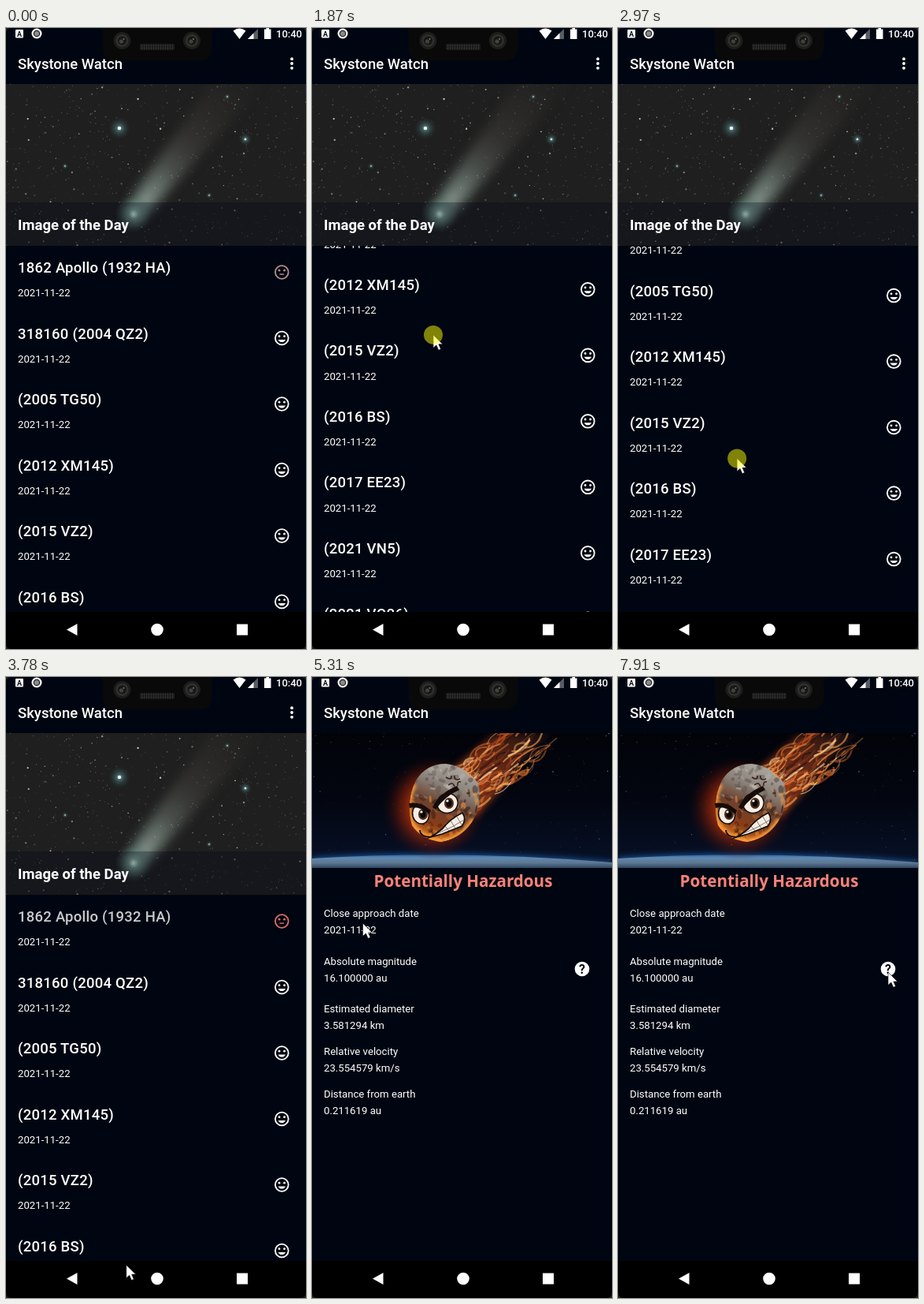
An HTML page with a canvas that plays this animation: 381x787 px, repeating every 8000 ms.

```html
<!DOCTYPE html>
<html lang="en">
<head>
<meta charset="utf-8">
<title>Skystone Watch</title>
<style>
  html, body { margin: 0; width: 100%; height: 100%; overflow: hidden; background: #000611; }
  canvas, svg { position: absolute; left: 0; display: block; }
  canvas { top: 71px; }
  svg { top: 0; }
  text { font-family: Roboto, sans-serif; fill: #fff; white-space: pre; }
  .bar { font-size: 18.54px; font-weight: 500; }
  .name { font-size: 18.54px; font-weight: 500; letter-spacing: .0125em; }
  .small { font-size: 13.2px; }
  .hazard { font: 700 20.6px "Open Sans", sans-serif; fill: #f9827a; text-anchor: middle; }
</style>
</head>
<body>
<canvas id="cometPhoto" width="381" height="205"></canvas>
<canvas id="rockPhoto" width="381" height="171"></canvas>
<svg width="381" height="787" viewBox="0 0 381 787">
  <defs>
    <clipPath id="listArea"><rect y="276" width="381" height="464"/></clipPath>
    <g id="ring"><circle r="8.35" fill="none" stroke="currentColor" stroke-width="1.85"/>
      <circle cx="-3.25" cy="-2.3" r="1.4" fill="currentColor"/><circle cx="3.25" cy="-2.3" r="1.4" fill="currentColor"/></g>
    <g id="happy"><use href="#ring"/><path d="M-4.7 1.9H4.7A5.1 5.1 0 0 1-4.7 1.9Z" fill="currentColor"/></g>
    <g id="neutral"><use href="#ring"/><path d="M-2.8 1.9h5.6v1.4h-5.6z" fill="currentColor"/></g>
    <g id="lens"><circle r="11" fill="#1d1d1c"/><circle r="8" fill="#30302e"/><circle r="5.5" fill="#171716"/>
      <circle cx="-1" cy="1" r="2.6" fill="#41413e"/><circle cx="2" cy="-2" r="1" fill="#77776f"/></g>
    <pattern id="mesh" width="3" height="3" patternUnits="userSpaceOnUse">
      <rect width="3" height="3" fill="#161616"/><circle cx="1.5" cy="1.5" r=".9" fill="#3b3b3b"/></pattern>
  </defs>

  <g id="listScreen">
    <text class="bar" x="15" y="256" style="font-weight:700">Image of the Day</text>
    <g fill="#fff"><circle cx="363" cy="39.2" r="1.9"/><circle cx="363" cy="45" r="1.9"/><circle cx="363" cy="50.8" r="1.9"/></g>
    <g clip-path="url(#listArea)"><g id="rows"></g></g>
  </g>

  <g id="detailScreen">
    <text class="hazard" x="192" y="265.5">Potentially Hazardous</text>
    <g id="facts"></g>
    <circle cx="343" cy="370" r="9.3" fill="#fff"/>
    <text x="343" y="375.8" text-anchor="middle" style="font-size:16px;font-weight:700;fill:#000611">?</text>
  </g>

  <text class="bar" x="15" y="51.5">Skystone Watch</text>

  <g id="statusBar" fill="#fff">
    <rect x="12" y="2" width="10" height="10.5" rx="1"/>
    <text x="17" y="10.5" text-anchor="middle" style="font-size:9px;font-weight:700;fill:#000611">A</text>
    <circle cx="39" cy="7" r="6.5"/><circle cx="39" cy="7" r="3.7" fill="#8a8a8a" stroke="#222" stroke-width="1.2"/>
    <path d="M288.500 3.500Q296.500-2.500 304.500 3.500L296.500 14Z"/>
    <path d="M320 1V14H307Z" opacity=".35"/><path d="M314.500 6.500V14H307Z"/>
    <path d="M328 1.500h2.500V0h3.500v1.500h2.500V14H328z"/>
    <text x="343" y="12" style="font-size:13px;font-weight:500">10:40</text>
  </g>

  <path d="M119 0Q123 1 123 8V26Q123 41 139 41H246Q261 41 261 26V8Q261 1 265 0Z" fill="#090909"/>
  <use href="#lens" x="147.500" y="16"/><use href="#lens" x="236" y="16"/>
  <rect x="170" y="20" width="44" height="8" rx="2" fill="url(#mesh)"/>

  <rect y="740" width="381" height="47"/>
  <g fill="#fff"><path d="M77 762.500L90.500 755V770Z"/><circle cx="192" cy="762.500" r="7.800"/><rect x="293" y="755.500" width="14" height="14"/></g>
  <g fill="#241d20"><path d="M0 0H7Q0 0 0 8Z"/><path d="M381 0H374Q381 0 381 8Z"/>
    <path d="M0 787H7Q0 787 0 779Z"/><path d="M381 787H374Q381 787 381 779Z"/></g>

  <g id="pointer">
    <path d="M0 0V16.500L3.900 13L6.700 19.300L9.600 18L6.900 11.900H12Z" fill="#fff" stroke="#000" stroke-width=".6"/>
    <circle id="touch" r="12" fill="#ff0" opacity=".5"/>
  </g>
</svg>

<script>
const $ = id => document.getElementById(id);
const LOOP = 8000, ROW = 83.5;

const asteroids = ['1862 Apollo (1932 HA)', '318160 (2004 QZ2)', '(2005 TG50)', '(2012 XM145)', '(2015 VZ2)',
  '(2016 BS)', '(2017 EE23)', '(2021 VN5)', '(2021 VQ26)'];
$('rows').innerHTML = asteroids.map((name, i) => `<g transform="translate(0 ${i * ROW})">
  <text class="name" x="15" y="310">${name}</text>
  <text class="small" x="15" y="340.400">2021-11-22</text>
  <use href="#${i ? 'happy' : 'neutral'}" x="350.300" y="309.500" color="#fff"/></g>`).join('');
const firstName = $('rows').querySelector('text');
const firstIcon = $('rows').querySelector('use');

const facts = [
  [304, 'Close approach date', '2021-11-22'], [364.5, 'Absolute magnitude', '16.100000 au'],
  [425, 'Estimated diameter', '3.581294 km'], [479, 'Relative velocity', '23.554579 km/s'],
  [533, 'Distance from earth', '0.211619 au']];
$('facts').innerHTML = facts.map(([y, label, value]) =>
  `<text class="small" x="15" y="${y}">${label}</text><text class="small" x="15" y="${y + 21.3}">${value}</text>`).join('');

function seeded(seed) {
  return () => (seed = (seed * 16807) % 2147483647) / 2147483647;
}

// Photos are painted in stage coordinates.
function photo(id) {
  const ctx = $(id).getContext('2d');
  ctx.translate(0, -71);
  return ctx;
}

function glow(ctx, x, y, r, ...colors) {
  const g = ctx.createRadialGradient(x, y, 0, x, y, r);
  colors.forEach((c, i) => g.addColorStop(i / (colors.length - 1), c));
  ctx.fillStyle = g;
  ctx.fillRect(x - r, y - r, 2 * r, 2 * r);
}

function fade(ctx, x0, y0, x1, y1, ...colors) {
  const g = ctx.createLinearGradient(x0, y0, x1, y1);
  colors.forEach((c, i) => g.addColorStop(i / (colors.length - 1), c));
  return g;
}

function ellipse(ctx, x, y, rx, ry, angle, color) {
  ctx.fillStyle = color;
  ctx.beginPath();
  ctx.ellipse(x, y, rx, ry, angle, 0, 7);
  ctx.fill();
}

function stars(ctx, count, seed, color, maxSize) {
  const rnd = seeded(seed);
  for (let i = 0; i < count; i++) {
    ctx.globalAlpha = .15 + .75 * rnd() ** 2;
    const size = .45 + maxSize * rnd() ** 7;
    ellipse(ctx, rnd() * 381, 71 + rnd() * 205, size, size, 0, color);
  }
  ctx.globalAlpha = 1;
}

function shape(ctx, path, fill, stroke, width = 1) {
  const p = new Path2D(path);
  if (fill) { ctx.fillStyle = fill; ctx.fill(p); }
  if (stroke) { ctx.strokeStyle = stroke; ctx.lineWidth = width; ctx.stroke(p); }
}

function paintComet() {
  const ctx = photo('cometPhoto');
  ctx.fillStyle = '#1f1f1f';
  ctx.fillRect(0, 71, 381, 205);
  stars(ctx, 800, 77, '#d8d4cc', .8);

  ctx.save();
  ctx.translate(163, 236);
  ctx.rotate(-.88);
  ctx.filter = 'blur(7px)';
  shape(ctx, 'M-12-3Q0-18 60-20L240-34V22L60 15Q0 17-12 4Z', fade(ctx, 0, 0, 240, 0,
    'rgba(125,152,142,.75)', 'rgba(125,138,130,.55)', 'rgba(95,92,86,.3)', 'rgba(75,70,64,.18)', 'rgba(60,57,52,0)'));
  shape(ctx, 'M-4-4L70-10V6L-4 5Z', fade(ctx, 0, 0, 70, 0, 'rgba(190,205,195,.8)', 'rgba(140,150,142,0)'));
  ctx.restore();
  glow(ctx, 162, 235, 24, 'rgba(150,190,176,.85)', 'rgba(90,130,118,.5)', 'rgba(60,92,84,0)');
  glow(ctx, 162, 236, 6, '#d5e8dd', 'rgba(180,215,200,0)');

  for (const [x, y, r] of [[144, 127, 14], [304, 141, 8], [258, 212, 4], [281, 87, 4], [75, 175, 4]]) {
    glow(ctx, x, y, r, 'rgba(140,190,195,.7)', 'rgba(65,105,108,.4)', 'rgba(40,65,65,0)');
    ellipse(ctx, x, y, r / 6, r / 6, 0, '#e9f5f3');
  }
  ctx.fillStyle = 'rgba(0,6,20,.3)';
  ctx.fillRect(0, 221, 381, 55);
}

function paintFlames(ctx, rnd) {
  ctx.save();
  ctx.filter = 'blur(5px)';
  shape(ctx, 'M178 118L232 72H302L268 104L236 146L206 178Z',
    fade(ctx, 190, 150, 290, 75, 'rgba(190,70,18,.9)', 'rgba(120,48,24,.8)', 'rgba(60,32,28,.5)'));
  ctx.filter = 'blur(.6px)';
  ctx.lineCap = 'round';
  const tones = ['#ffe0a8', '#ffb25e', '#ee7a30', '#c4521e', '#5a2418', '#1d0e0c'];
  for (let i = 0; i < 150; i++) {
    const along = rnd(), across = (rnd() - .5) * 64;
    const x = 188 + 90 * along + across * .6, y = 148 - 70 * along + across * .72;
    const length = 10 + 18 * rnd(), bend = (rnd() - .5) * 18;
    ctx.globalAlpha = .3 + .5 * rnd();
    shape(ctx, `M${x} ${y}q${length * .45 + bend} ${bend - length * .25} ${length} ${-length * .75}`, null,
      tones[Math.min(5, Math.floor(rnd() * 5 + along * 1.2))], .6 + 3 * rnd() * (1 - along * .4));
  }
  ctx.restore();
}

function paintRock() {
  const ctx = photo('rockPhoto'), rnd = seeded(41);
  ctx.fillStyle = fade(ctx, 0, 71, 0, 236, '#020309', '#030610', '#071026');
  ctx.fillRect(0, 71, 381, 171);
  stars(ctx, 220, 19, '#7088ac', .5);

  ctx.save();
  ctx.shadowColor = '#1f66b4';
  ctx.shadowBlur = 8;
  shape(ctx, 'M0 230Q185 219 381 235V242H0Z', fade(ctx, 0, 223, 0, 242, '#1c569e', '#5f88ae', '#5d7791', '#2f4560'));
  ctx.restore();

  glow(ctx, 155, 166, 66, 'rgba(255,110,20,.9)', 'rgba(235,75,10,.85)', 'rgba(150,34,8,.5)', 'rgba(50,8,4,0)');
  paintFlames(ctx, rnd);

  const outline = 'M132 131Q145 110 170 110Q196 113 211 135Q217 158 206 179Q192 204 164 209Q139 206 127 188Q119 158 132 131Z';
  shape(ctx, outline, fade(ctx, 176, 112, 138, 208, '#aaa49c', '#8a827a', '#6b4230', '#8a3c16', '#f08a2c'));
  ctx.save();
  ctx.clip(new Path2D(outline));
  for (let i = 0; i < 130; i++) {
    const x = 122 + 92 * rnd(), y = 110 + 100 * rnd(), stony = y < 152 && x < 196;
    ctx.globalAlpha = .2 + .35 * rnd();
    ellipse(ctx, x, y, 1.5 + 5 * rnd(), 1 + 2.5 * rnd(), rnd() * 3,
      stony ? (i % 2 ? '#55504c' : '#c8c2ba') : (i % 3 ? '#2e120b' : '#ff9a38'));
  }
  ctx.globalAlpha = 1;
  ctx.filter = 'blur(2px)';
  shape(ctx, 'M130 136Q117 162 128 187Q140 207 166 208Q190 204 205 180', null, '#ffa23c', 6);
  ctx.restore();

  const ink = '#160c09', white = '#f4eee5';
  ellipse(ctx, 138, 174, 11, 13, -.3, ink);
  ellipse(ctx, 138, 174, 9.5, 11.5, -.3, white);
  ellipse(ctx, 172, 160, 14, 13, -.3, ink);
  ellipse(ctx, 172, 160, 12.5, 11.5, -.3, white);
  for (const [x, y] of [[141, 174], [174, 160]]) {
    ellipse(ctx, x, y, 6, 7, 0, '#4b2c1b');
    ellipse(ctx, x, y, 3.5, 4.5, 0, '#090606');
    ellipse(ctx, x - 2, y - 3, 1.6, 1.6, 0, '#fff');
  }
  shape(ctx, 'M123 160Q136 157 151 169L149 174Q136 163 124 166Z', ink);
  shape(ctx, 'M153 165Q162 147 184 138L187 143Q169 151 157 168Z', ink);
  shape(ctx, 'M170 127Q178 132 177 125M181 125Q180 132 188 129M173 137Q179 132 181 139M185 138Q184 132 189 133', null, '#3a201a', 1.5);
  shape(ctx, 'M150 203Q158 199 166 192Q175 180 191 172Q197 181 190 189Q178 194 165 199Z', white, ink, 1.8);
  shape(ctx, 'M160 198Q178 191 193 181M169 189L174 195M176 182L182 192M184 177L190 187', null, '#6b5a50', .8);
  shape(ctx, 'M137 194Q137 202 150 203', null, ink, 1.8);
}

// Linear interpolation over keyframes of [time, ...values].
function at(keys, t) {
  const i = keys.findIndex(k => k[0] > t);
  if (i === 0) return keys[0].slice(1);
  if (i < 0) return keys[keys.length - 1].slice(1);
  const a = keys[i - 1], b = keys[i], p = (t - a[0]) / (b[0] - a[0]);
  return a.slice(1).map((v, n) => v + (b[n + 1] - v) * p);
}

const pointerPath = [[590, 300, 774], [930, 195, 652], [1200, 195, 652], [1340, 193, 614], [1870, 154, 389],
  [2150, 150, 356], [2540, 150, 356], [3300, 152, 690], [3560, 153, 742], [3780, 153, 746], [4170, 62, 425],
  [4430, 42, 350], [4630, 64.5, 312], [6230, 64.5, 312], [6920, 321, 373], [7050, 323, 374], [7380, 343, 374]];
const scrollPath = [[1200, 0], [1340, 14], [1870, 228.3], [1940, 255], [2010, 275], [2150, 293.5],
  [2540, 293.5], [2620, 284], [3300, 0]];
const touches = [[1200, 3500], [4980, 5180], [7780, 7910]];

const show = (id, on) => { $(id).style.display = on ? '' : 'none'; };

function render(t) {
  const detail = t >= 5180;
  show('listScreen', !detail);
  show('cometPhoto', !detail);
  show('detailScreen', detail);
  show('rockPhoto', detail);
  show('pointer', t >= 590);
  show('touch', touches.some(([from, to]) => t >= from && t < to));
  $('rows').setAttribute('transform', `translate(0 ${-at(scrollPath, t)[0]})`);
  $('pointer').setAttribute('transform', `translate(${at(pointerPath, t)})`);
  firstName.style.fill = t >= 3370 ? '#c9cbce' : '#fff';
  firstIcon.setAttribute('color', t < 1200 ? '#b58f8c' : t < 3370 ? '#dc8583' : '#d96f6c');
}

paintComet();
paintRock();
const start = performance.now();
function frame() {
  render((performance.now() - start) % LOOP);
  requestAnimationFrame(frame);
}
frame();
</script>
</body>
</html>
```
